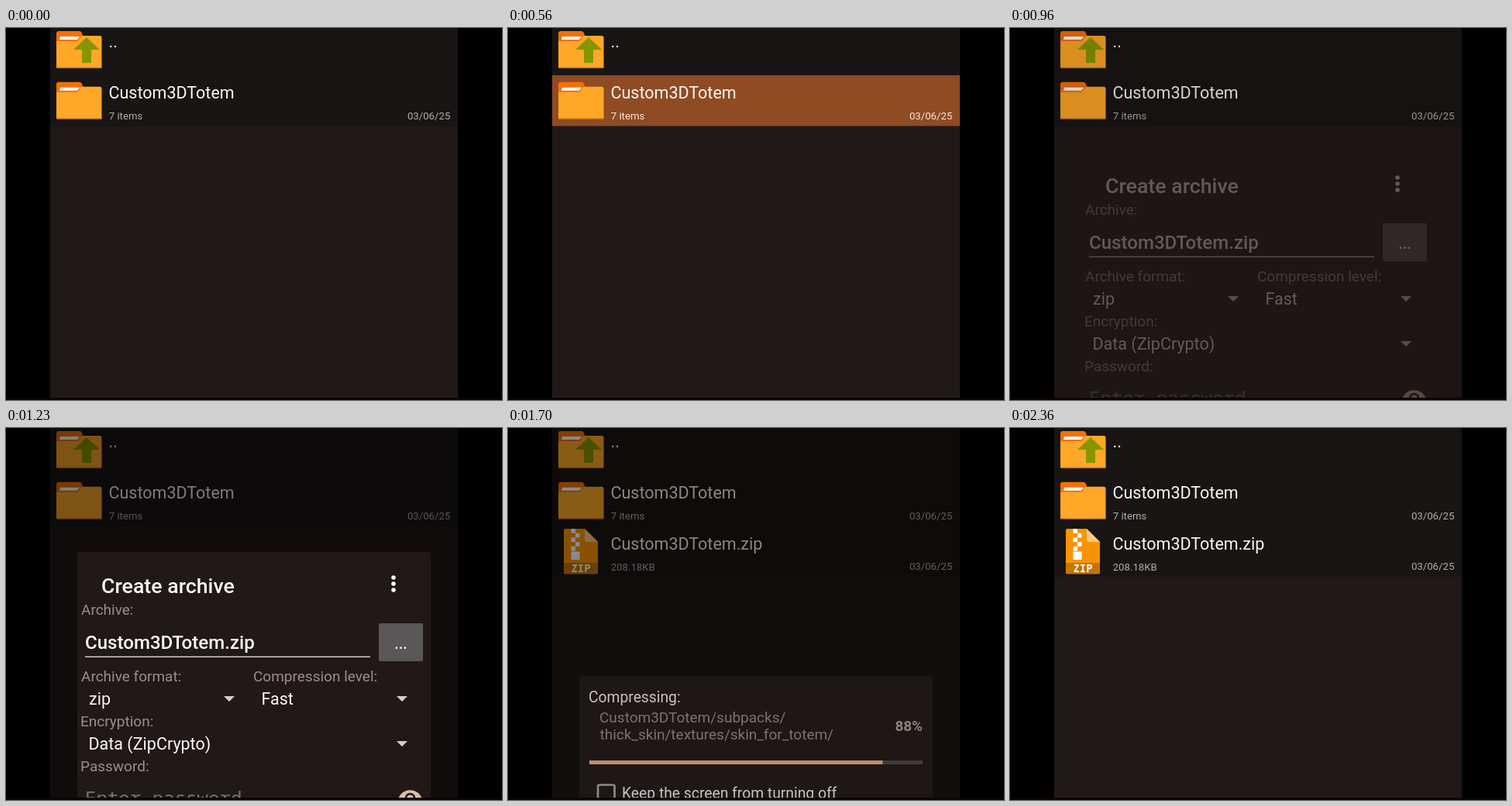
An HTML page with a canvas for the animation above (2430 ms loop, 640 px wide and 480 px high).

```html
<!DOCTYPE html>
<html lang="en">
<head>
<meta charset="utf-8">
<title>Create archive</title>
<style>
html, body { margin: 0; width: 100%; height: 100%; overflow: hidden; background: #000; }
canvas { display: block; width: 640px; height: 480px; }
</style>
</head>
<body>
<canvas id="stage" width="640" height="480"></canvas>
<script>
const ctx = document.getElementById('stage').getContext('2d');
const LOOP = 2430;
const SANS = 'Roboto, sans-serif';
const MONO = '"Noto Sans Mono", monospace';
const INK = '#fff8f5', MUTED = '#9c8f8a', SMALL = '#b3adaa';

// Each track lists [time, value] stops, linear in between.
const tracks = {
  highlight: [[230, 0], [430, 1], [630, 1], [800, 0]],
  dim: [[900, 0], [1100, 0.5], [1430, 0.5], [1500, 0.46], [1700, 0.46], [1960, 0]],
  archive: [[900, 0], [1100, 1], [1430, 1], [1500, 0.52], [1560, 0]],
  progress: [[1500, 0], [1630, 0.9], [1700, 0.76], [1830, 0]]
};
const ZIP_APPEARS = 1680;

function valueAt(stops, t) {
  if (t <= stops[0][0]) return stops[0][1];
  for (let i = 1; i < stops.length; i++) {
    const [t0, v0] = stops[i - 1], [t1, v1] = stops[i];
    if (t <= t1) return v0 + (v1 - v0) * (t - t0) / (t1 - t0);
  }
  return stops[stops.length - 1][1];
}

// Holds the picture at 15 steps per second, on a 10 ms clock.
function heldTime(t) {
  if (t < 100) return 0;
  const tick = Math.floor((3 * (Math.floor(t / 10) - 10) + 2) / 20);
  return 100 + Math.floor(tick * 20 / 3) * 10;
}

function rect(x, y, w, h, color, radius = 0) {
  ctx.fillStyle = color;
  ctx.beginPath();
  ctx.roundRect(x, y, w, h, radius);
  ctx.fill();
}

function poly(color, ...points) {
  ctx.fillStyle = color;
  ctx.beginPath();
  for (let i = 0; i < points.length; i += 2) ctx.lineTo(points[i], points[i + 1]);
  ctx.closePath();
  ctx.fill();
}

function text(str, x, y, size, color = INK, { weight = 400, family = SANS, align = 'left' } = {}) {
  ctx.font = `${weight} ${size}px ${family}`;
  ctx.textAlign = align;
  ctx.fillStyle = color;
  ctx.fillText(str, x, y);
}

function at(x, y, draw) {
  ctx.save();
  ctx.translate(x, y);
  draw();
  ctx.restore();
}

function folder() {
  rect(0, 0, 32.5, 24, '#f57005', [3, 3, 0, 0]);
  poly('#f57005', 30, 0.5, 32.5, 1.5, 35, 8, 30, 8);
  poly('#fff', 5, 7, 30, 7, 27, 11, 4, 11);
  ctx.fillStyle = '#ffa726';
  ctx.beginPath();
  ctx.moveTo(0, 13);
  ctx.lineTo(26, 13);
  ctx.quadraticCurveTo(28, 13, 29, 11);
  ctx.lineTo(31, 7.5);
  ctx.quadraticCurveTo(32, 6, 34, 6);
  ctx.lineTo(56, 6);
  ctx.quadraticCurveTo(58.5, 6, 58.5, 8.5);
  ctx.lineTo(58.5, 47.5);
  ctx.lineTo(0, 47.5);
  ctx.fill();
  rect(0, 46.5, 58.5, 1.2, '#cf851c');
}

function zipIcon() {
  poly('#f89406', 0, 1.5, 1.5, 0, 27, 0, 44, 17, 44, 58, 0, 58);
  poly('#ffca80', 27, 0, 44, 17, 29, 17, 27, 15);
  rect(0, 44, 44, 14.5, '#c47604', [0, 0, 3, 3]);
  for (let i = 0; i < 5; i++) rect(9.5 + (i % 2) * 5.5, i * 5.7, 5.5, 5.7, '#fff');
  rect(9.5, 29.5, 11, 10.5, '#fff');
  text('ZIP', 22, 56, 14, '#fff', { weight: 700, family: MONO, align: 'center' });
}

function rowText(y, name, info, infoColor) {
  text(name, 132.5, y + 30, 21.5);
  text(info, 132.7, y + 57, 13.2, infoColor);
  text('03/06/25', 573.3, y + 56.5, 13.2, infoColor, { align: 'right' });
}

function fileList(highlight, hasZip) {
  rect(57, 0, 526, 480, '#211917');
  rect(57, 0, 526, hasZip ? 192 : 127, '#191514');
  at(65, 4, folder);
  poly('#879600', 104, 12, 121, 28, 110, 28, 110, 45, 98, 45, 98, 28, 87, 28);
  text('..', 132.5, 25, 21.5);

  ctx.globalAlpha = highlight;
  rect(57, 61, 526, 65.5, '#8f4b24');
  ctx.globalAlpha = 1;
  at(65, 69.7, folder);
  rowText(61, 'Custom3DTotem', '7 items', highlight > 0.5 ? '#f4e6df' : SMALL);

  if (hasZip) {
    at(72, 130, zipIcon);
    rowText(126.5, 'Custom3DTotem.zip', '208.18KB', SMALL);
  }
}

function caret(x, y) {
  poly('#d8cdc8', x - 7, y - 3.5, x + 7, y - 3.5, x, y + 3.5);
}

function eye() {
  const shape = new Path2D('M-11 0C-9.27-4.39-5-7.5 0-7.5S9.27-4.39 11 0C9.27 4.39 5 7.5 0 7.5S-9.27 4.39-11 0z');
  shape.arc(0, 0, 5, 0, Math.PI * 2);
  ctx.scale(1.364, 1.364);
  ctx.fillStyle = '#dcbcaa';
  ctx.fill(shape, 'evenodd');
  ctx.beginPath();
  ctx.arc(0, 0, 3, 0, Math.PI * 2);
  ctx.fill();
}

function archiveDialog() {
  rect(92, 160, 456, 330, '#211917', 3);
  text('Create archive', 123, 213, 26.7, INK, { weight: 500 });
  for (const y of [193, 201, 209]) rect(497.2, y - 2.8, 5.6, 5.6, INK, 2.8);

  text('Archive:', 97, 241, 19, MUTED);
  text('Custom3DTotem.zip', 102, 285, 24.1, INK, { weight: 500 });
  rect(102, 294.5, 368, 1.5, '#d3c8c3');
  rect(481, 252, 57, 49, '#5a5759', 2);
  text('...', 509.5, 285, 19.5, INK, { weight: 500, align: 'center' });

  text('Archive format:', 97, 327, 19, MUTED);
  text('Compression level:', 319, 327, 19, MUTED);
  text('zip', 107, 357, 21.5);
  text('Fast', 329.5, 357, 21.5);
  caret(288, 349.5);
  caret(511, 349.5);

  text('Encryption:', 96, 385, 19, MUTED);
  text('Data (ZipCrypto)', 106.5, 415, 21.5);
  caret(511, 407.5);

  text('Password:', 96, 443, 19, MUTED);
  text('Enter password', 102, 486, 24.1, '#7d726d', { family: MONO });
  at(521.5, 477.5, eye);
}

function progressDialog() {
  rect(92, 320, 456, 170, '#211b19', 3);
  text('Compressing:', 104, 354, 19.3);
  text('Custom3DTotem/subpacks/', 118, 380, 19, MUTED);
  text('thick_skin/textures/skin_for_totem/', 118.5, 402, 19, MUTED);
  text('88%', 535, 391, 18.9, '#b3a49d', { weight: 700, align: 'right' });
  rect(105, 429, 430, 5, '#4c4643');
  rect(105, 429, 430 * 0.88, 5, '#f0a87b');
  ctx.strokeStyle = '#b8aca6';
  ctx.lineWidth = 2.7;
  ctx.beginPath();
  ctx.roundRect(116, 460.5, 21.5, 22, 2);
  ctx.stroke();
  text('Keep the screen from turning off', 147, 478, 19.3);
}

function layer(alpha, draw) {
  if (alpha <= 0) return;
  ctx.globalAlpha = alpha;
  draw();
  ctx.globalAlpha = 1;
}

function render(t) {
  const level = name => valueAt(tracks[name], t);
  rect(0, 0, 640, 480, '#000');
  fileList(level('highlight'), t >= ZIP_APPEARS);
  layer(level('dim'), () => rect(0, 0, 640, 480, '#000'));
  layer(level('archive'), archiveDialog);
  layer(level('progress'), progressDialog);
  rect(0, 477, 640, 3, '#0e0406');
}

let start;
function loop(now) {
  start ??= now;
  render(heldTime((now - start) % LOOP));
  requestAnimationFrame(loop);
}
render(0);
requestAnimationFrame(loop);
</script>
</body>
</html>
```
